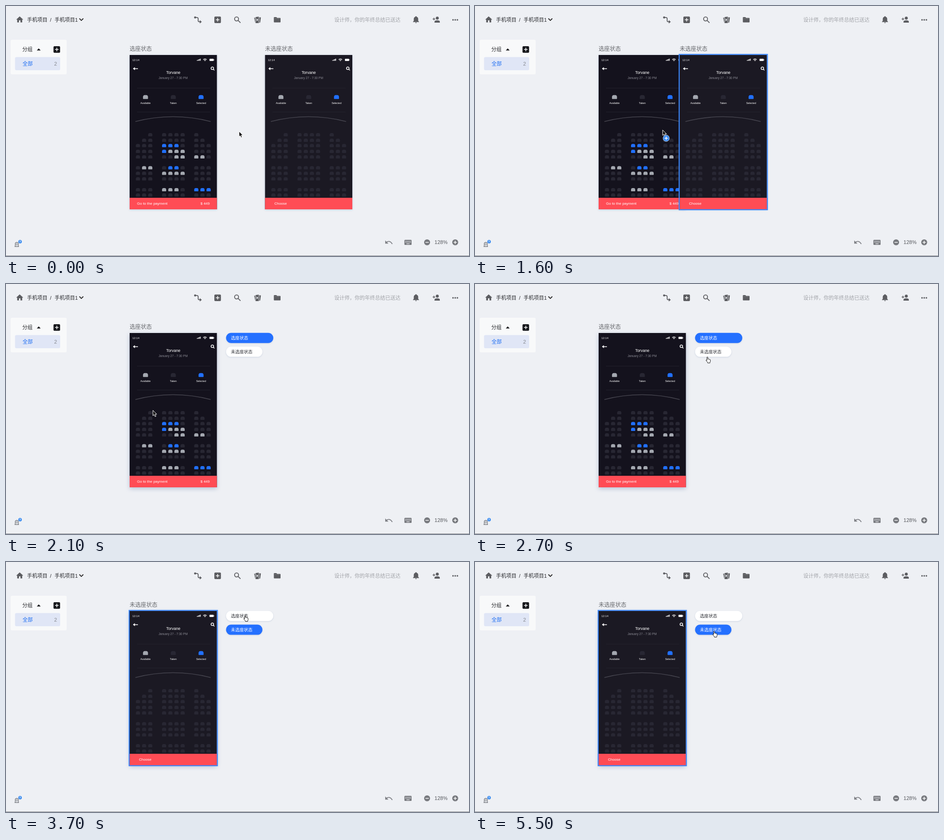
Write an HTML page that moves like this. It is 1000x541 px and loops after 6500 ms.

```html
<!DOCTYPE html>
<html lang="zh-CN">
<head>
<meta charset="utf-8">
<title>Board drag</title>
<style>
html, body { margin: 0; width: 100%; height: 100%; overflow: hidden; background: #eef0f4; }
svg { display: block; width: 100%; height: 100%; }
text { font-family: "Liberation Sans", "Noto Sans CJK SC", "Noto Sans CJK", sans-serif; }
.ui { font-size: 11px; fill: #26272b; }
.label { font-size: 12px; fill: #67696d; font-weight: 300; }
.pill rect { fill: #fff; filter: drop-shadow(0 1px 1.5px rgba(70, 100, 150, .2)); }
.pill text { font-size: 9.3px; fill: #303238; }
.pill.on rect { fill: #2470ff; }
.pill.on text { fill: #fff; }
.icon { fill: #5c5d61; }
.line { fill: none; stroke: #5c5d61; stroke-width: 1.8; }
.white { fill: none; stroke: #fff; stroke-width: 1.5; }
.mid { text-anchor: middle; }
.outline { fill: none; stroke: #3b87fa; stroke-width: 2.2; }
.paper { filter: drop-shadow(0 1px 2px rgba(80, 110, 160, .3)); }
.lifted .paper { filter: drop-shadow(0 3px 5px rgba(80, 110, 160, .35)); }
</style>
</head>
<body>
<svg viewBox="0 0 1000 541">
  <rect width="1000" height="541" fill="#eef0f4"/>
  <rect y="540" width="1000" height="1" fill="#85878a"/>

  <!-- top bar -->
  <path class="icon" d="M29.5 22.5L22 29.5H24.2V35.5H28V31H31.2V35.5H35V29.5H37.3Z"/>
  <text class="ui" x="45.5" y="33.7">手机项目</text>
  <text class="ui" x="95" y="33.7">/</text>
  <text class="ui" x="105" y="33.7">手机项目1</text>
  <path d="M158.5 27L162.7 31.3L167 27" class="line" style="stroke:#222"/>

  <path class="line" d="M409 24.8H412.5Q415 24.8 415 27.5V31.5Q415 34.2 417.5 34.2H420"/>
  <circle class="icon" cx="408.5" cy="24.8" r="2.3"/>
  <path class="icon" d="M418.5 30.5L422.8 34.2L418.5 38Z"/>
  <rect class="icon" x="450" y="22.7" width="14.2" height="14.2" rx="2"/>
  <path class="white" d="M457.1 26V33.6M453.3 29.8H460.9"/>
  <circle class="line" cx="498" cy="28" r="4.3"/>
  <path class="line" d="M501.2 31.2L506.5 36.4" stroke-width="2.2"/>
  <path class="icon" d="M536 25.5L538 25V36.5ZM539 24L546 23V37H539ZM547 24.2L550.5 24.8L549 35.5L547 36.5Z"/>
  <path d="M541.2 26.8V33L544.8 29.9Z" fill="#eef0f4"/>
  <path class="icon" d="M578.5 25.2Q578.5 24 579.7 24H584L585.6 25.7H591.8Q593 25.7 593 27V34.3Q593 35.6 591.8 35.6H579.7Q578.5 35.6 578.5 34.3Z"/>
  <path d="M580 27.4H591.6" stroke="#85868a" stroke-width=".7"/>
  <text class="ui" x="709" y="33.8" style="fill:#a2a4a9;font-weight:300">设计师，你的年终总结已送达</text>
  <path class="icon" d="M885.5 22Q886.7 22 886.8 23.2Q890.3 24.2 890.3 28.3V32.3L892 34V34.8H879V34L880.7 32.3V28.3Q880.7 24.2 884.2 23.2Q884.3 22 885.5 22ZM884 35.5H887Q887 37.3 885.5 37.3T884 35.5Z"/>
  <circle class="icon" cx="931.5" cy="26.2" r="3.2"/>
  <path class="icon" d="M925.5 36V34Q925.5 31 931.3 31T937 34V36Z"/>
  <path class="line" d="M924.3 25.3V31.1M921.4 28.2H927.2" style="stroke-width:1.4"/>
  <g class="icon"><circle cx="965.5" cy="30" r="1.7"/><circle cx="970.2" cy="30" r="1.7"/><circle cx="974.9" cy="30" r="1.7"/></g>

  <!-- group panel -->
  <rect x="10" y="73" width="121" height="75" rx="3" fill="#f8f9fa"/>
  <text class="ui" x="35.3" y="98" font-weight="500">分组</text>
  <path d="M66.5 96.2L70.7 91.8L74.9 96.2Z" fill="#17181c"/>
  <rect x="102.6" y="87" width="14.2" height="14.2" rx="2" fill="#17181c"/>
  <path class="white" d="M109.7 90.3V97.9M105.9 94.1H113.5"/>
  <rect x="19.5" y="110.5" width="97.5" height="28.5" rx="3" fill="#e0e6f6"/>
  <text class="ui" x="35.8" y="128.8" font-weight="500" style="fill:#1c6df2">全部</text>
  <text class="ui" x="104" y="128.8" style="fill:#85888f">2</text>

  <!-- bottom bar -->
  <path d="M18.5 520.5H28M20 520V514.5Q20 511.5 23.3 511.5T26.7 514.5V520" fill="none" stroke="#777a80" stroke-width="1.3"/>
  <circle cx="23.3" cy="515.8" r="1.7" fill="none" stroke="#777a80"/>
  <circle cx="30.4" cy="510" r="3.8" fill="#3d8df0"/>
  <text class="mid" x="30.4" y="512.2" font-size="6" font-weight="700" fill="#fff">?</text>
  <path d="M821 511.5Q829 506 834.3 515" fill="none" stroke="#808287" stroke-width="1.9"/>
  <path d="M819 507.3V514.3H826Z" fill="#808287"/>
  <rect x="860.5" y="506" width="15.5" height="11" rx="1.5" fill="#77797e"/>
  <path d="M862.5 509H874.3M862.5 511.5H874.3" stroke="#eef0f4" stroke-width="1.3" stroke-dasharray="1.4 1.2"/>
  <path d="M865 514.6H871.5" stroke="#eef0f4" stroke-width="1.2"/>
  <circle cx="909.5" cy="511.4" r="6.4" fill="#77797e"/>
  <circle cx="970.2" cy="511.4" r="6.4" fill="#77797e"/>
  <path class="white" d="M906 511.4H913M966.7 511.4H973.7M970.2 507.9V514.9"/>
  <text class="ui" x="925.6" y="515.3" style="fill:#55575c">128%</text>

  <g id="seated"></g>
  <g id="empty"></g>

  <g id="pills">
    <g class="pill" id="pillA"><rect x="475.3" y="105.8" width="102" height="22" rx="11"/><text x="485.8" y="120.3">选座状态</text></g>
    <g class="pill" id="pillB"><rect x="475.3" y="135.6" width="78.5" height="22" rx="11"/><text x="485.8" y="150">未选座状态</text></g>
  </g>

  <g id="cursor">
    <g id="arrow">
      <path d="M.3 .3V12L3 9.6L5 14L7 13.1L5.1 8.8H8.6Z" fill="#111" stroke="#fff" stroke-width="1"/>
      <g id="badge">
        <circle cx="8" cy="18.2" r="6.9" fill="#3d8df5" stroke="#fff" stroke-width=".6"/>
        <path class="white" d="M8 14.6V21.8M4.4 18.2H11.6"/>
      </g>
    </g>
    <path id="hand" d="M2.3 1.8Q2.4 .6 3.4 .6T4.5 1.8V5Q6 4.4 6.4 5.5Q7.7 5 8.2 6Q9.9 5.8 9.9 7.5V9.5Q9.9 11 9 12.2V13.6H4V12.4L1 8.9Q0 7.5 1 7Q1.8 6.8 2.6 8Z" fill="#fff" stroke="#111" stroke-width="1"/>
  </g>
</svg>
<script>
const $ = id => document.getElementById(id);
const LOOP = 6500, STEP = 100, HOME_X = 267, TOP_Y = 106;
const DRAG = 1400, MERGE = 1900;

// Seats per row: left, middle and right block; t taken, a available, s selected
const colX = [18, 31.3, 44.6, 74.5, 88, 101.2, 114.5, 144, 157.3, 170.6];
const rowY = [172.5, 184.5, 196, 208.5, 220.5, 244, 256, 268, 291.5, 303];
const plan = [
  '  tttttt  ', ' tttttttt ', 'tttssstttt', 'tttsaaattt', 'tttttaaaat',
  'taatsstttt', 'tttaaaattt', 'tttttttttt', 'tttaaatsss', 'tttttttttt'
];

function seat(x, y, kind, scale = 1) {
  const fill = { t: '#282733', a: '#a4a8b0', s: '#2170ff' }[kind];
  return `<path transform="translate(${x} ${y}) scale(${scale})" fill="${fill}"
    d="M-4.5 2.8V-.5Q-4-3.5-1.5-3.5H1.5Q4-3.5 4.5-.5V2.8Q4.5 3.5 3.8 3.5H-3.8Q-4.5 3.5-4.5 2.8Z"/>`;
}

function text(x, y, size, str, attrs = '') {
  return `<text x="${x}" y="${y}" font-size="${size}" fill="#fff" ${attrs}>${str}</text>`;
}

function board(label, bg, rows, footer) {
  const legend = [['Available', 'a'], ['Taken', 't'], ['Selected', 's']].map(([name, kind], i) =>
    seat(34.3 + 60 * i, 91, kind, 1.2) + text(34.3 + 60 * i, 105.6, 5.6, name, 'class="mid" letter-spacing="-.06"'));
  const seats = rows.map((row, r) => [...row].map((k, c) => k === ' ' ? '' : seat(colX[c], rowY[r], k)).join(''));
  return `<text class="label" x="0" y="-9">${label}</text>
    <rect class="paper" width="188.5" height="334" fill="${bg}"/>
    ${text(6, 12.8, 6, '12:14')}
    <path d="M146 12.5V11M148.2 12.5V10M150.4 12.5V9M152.6 12.5V8" stroke="#fff" stroke-width="1.5"/>
    <path d="M159 10Q162.7 6.6 166.4 10M160.6 11.6Q162.7 9.8 164.8 11.6" fill="none" stroke="#fff" stroke-width="1.1"/>
    <circle cx="162.7" cy="12.6" r=".8" fill="#fff"/>
    <rect x="172.5" y="8.3" width="9" height="4.6" rx="1.2" fill="#fff"/>
    <path d="M182.4 9.6V11.6" stroke="#fff" stroke-width=".8"/>
    <path class="white" d="M8.5 29.6H18" stroke-width="1.6"/>
    <path d="M7.2 29.6L11.4 26.2V33Z" fill="#fff"/>
    <circle class="white" cx="178.7" cy="28.8" r="2.8"/>
    <path class="white" d="M180.8 31L183.2 33.3"/>
    ${text(94.3, 41.3, 8.8, 'Torvane', 'class="mid" letter-spacing="-.1"')}
    ${text(94, 52.2, 6.6, 'January 27 - 7:30 PM', 'class="mid" style="fill:#8b8b94"')}
    <path d="M16 71.7H174M16 123.4H174" stroke="#262530" stroke-width=".9"/>
    <path d="M12.5 144Q94 123 175 144" fill="none" stroke="#45444e" stroke-width="1.7"/>
    ${legend.join('')}${seats.join('')}
    <rect y="309" width="188.5" height="25" fill="#ff4c55"/>${footer}
    <rect class="outline" x="-1" y="-1.2" width="190.5" height="336"/>`;
}

$('seated').innerHTML = board('选座状态', '#14121d', plan,
  text(16, 324.3, 8, 'Go to the payment') + text(153, 324.3, 8, '$ 449'));
$('empty').innerHTML = board('未选座状态', '#1b1923', plan.map(r => r.replace(/[as]/g, 't')),
  text(20.2, 324.3, 7.8, 'Choose'));

const cursorPath = [
  [1000, 503, 271], [1300, 605, 274], [1400, 600, 274], [1600, 405, 268], [1900, 317, 273],
  [2200, 317, 273], [2800, 513, 148], [3100, 510, 145], [3400, 510, 145], [3700, 513, 115],
  [4000, 513, 115], [4300, 514, 139], [4500, 513, 149]
];
const dragPath = [[DRAG, 559.5], [1600, 442], [MERGE, HOME_X]];

function along(path, t) {
  if (t <= path[0][0]) return path[0].slice(1);
  const i = path.findIndex(p => p[0] > t);
  if (i < 0) return path[path.length - 1].slice(1);
  const a = path[i - 1], b = path[i], u = (t - a[0]) / (b[0] - a[0]);
  const e = u * u * (3 - 2 * u);
  return a.slice(1).map((v, k) => v + (b[k + 1] - v) * e);
}

const show = (el, on) => el.setAttribute('visibility', on ? 'visible' : 'hidden');
const move = (id, x, y) => $(id).setAttribute('transform', `translate(${x.toFixed(2)} ${y.toFixed(2)})`);

function draw(now) {
  const t = Math.floor(now % LOOP / STEP) * STEP;
  const merged = t >= MERGE;
  const pickedEmpty = t >= 2800 && t < 3800 || t >= 4500;
  const [x, y] = along(cursorPath, t);
  const hand = t >= 2700;

  move('seated', HOME_X, TOP_Y);
  move('empty', along(dragPath, t)[0], TOP_Y);
  for (const id of ['seated', 'empty']) {
    const on = !merged || (id === 'empty') === pickedEmpty;
    $(id).setAttribute('class', merged ? 'lifted' : '');
    show($(id), on);
    show($(id).querySelector('.outline'),
      on && (t >= 2800 || id === 'empty' && t >= DRAG && !merged));
  }

  show($('pills'), merged);
  $('pillA').setAttribute('class', pickedEmpty ? 'pill' : 'pill on');
  $('pillB').setAttribute('class', pickedEmpty ? 'pill on' : 'pill');

  move('cursor', x, y);
  show($('arrow'), !hand);
  show($('hand'), hand);
  show($('badge'), t >= 1500 && !merged);
}

const start = performance.now();
function tick() {
  draw(performance.now() - start);
  requestAnimationFrame(tick);
}
tick();
</script>
</body>
</html>
```
